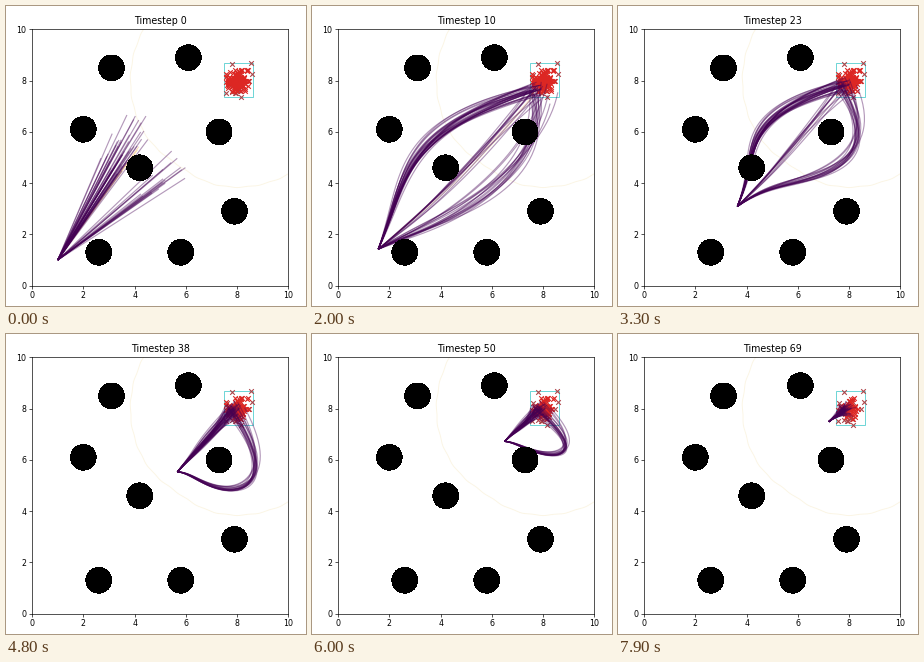
Animation, 300 px wide and 300 px high, one loop 8000 ms. Source, as a matplotlib script:

```python
import numpy as np
import matplotlib.pyplot as plt
from matplotlib.animation import FuncAnimation
from matplotlib.collections import LineCollection
from matplotlib.patches import Circle, Rectangle

FRAMES, HOLD = 80, 10
PURPLE = "#440154"
GOAL = np.array([8.0, 8.0])
OBSTACLES = [(3.1, 8.5), (6.1, 8.9), (2.0, 6.1), (7.3, 6.0),
             (4.2, 4.6), (7.9, 2.9), (2.6, 1.3), (5.8, 1.3)]

# Robot route: a few timesteps and the positions reached there
KEYS = np.array([0, 6, 19, 28, 44, 54, 69], float)
ROUTE = np.array([(1.0, 1.0), (1.2, 1.15), (2.9, 2.46), (4.56, 3.94),
                  (6.12, 6.28), (6.71, 6.94), (7.21, 7.49)])
SLOPES = np.gradient(ROUTE, KEYS, axis=0)

T = np.linspace(0, 1, 40)[:, None]
BASIS = np.hstack([(1 - T) ** 3, 3 * T * (1 - T) ** 2, 3 * T ** 2 * (1 - T), T ** 3])
HOOK = 25 * T * (1 - T) ** 6

rng = np.random.default_rng(7)


def smooth(x, a, b):
    u = np.clip((x - a) / (b - a), 0, 1)
    return u * u * (3 - 2 * u)


def robot_at(step):
    """Position and velocity on the route (cubic Hermite)."""
    i = min(int(np.searchsorted(KEYS, step, "right")) - 1, len(KEYS) - 2)
    span = KEYS[i + 1] - KEYS[i]
    u = (step - KEYS[i]) / span
    rise = u * u * (3 - 2 * u)
    pos = (ROUTE[i] * (1 - rise) + ROUTE[i + 1] * rise
           + span * u * (1 - u) ** 2 * SLOPES[i]
           - span * u * u * (1 - u) * SLOPES[i + 1])
    return pos, SLOPES[i] * (1 - u) + SLOPES[i + 1] * u


def end_at(step):
    return GOAL - (0.1, 0) - np.array([0.15, 0.35]) * (1 - smooth(step, 18, 28))


def bowed(start, end, bulge):
    """Bezier controls of a curve bowed to the left of its chord."""
    chord = end - start
    left = np.array([-chord[1], chord[0]])
    return np.array([start + 0.38 * chord + bulge * left,
                     start + 0.57 * chord + 1.1 * bulge * left, end])


def upper(step, start):
    # The detour widens until the first obstacle is passed
    bulge = (0.065 + 0.0155 * step) * (1 - smooth(step, 20, 27))
    return bowed(start, end_at(step), bulge)


def middle(step, start):
    return bowed(start, end_at(step), -0.06 * np.exp(-step / 20))


def lower(step, start):
    # A corner point pulls the curve under the last obstacle, then slides home
    corner = np.array([8.2 + 2.3 * smooth(step, 8, 30), 4.1])
    pull = corner + (GOAL - corner) * (smooth(step, 54, 66), smooth(step, 44, 58))
    dip = np.array([1.2, 1.3]) * np.exp(-((step - 43) / 6) ** 2)
    lift = (0, 0.9 * np.exp(-((step - 23) / 8) ** 2))
    late = np.array([0.8, -0.6]) * np.exp(-step / 8)
    return np.array([start + 0.32 * (pull - start) - dip + lift,
                     pull, end_at(step) + late])


class Bundle:
    def __init__(self, n, shape, low, high, loose=0.0):
        self.shape, self.loose = shape, loose
        self.noise = rng.normal(size=(n, 3, 2)).clip(-2, 2)
        angle = np.radians(rng.triangular(low, (low + high) / 2, high, n))
        tips = rng.uniform(4.0, 6.6, n) * np.array([np.cos(angle), np.sin(angle)])
        self.rays = ROUTE[0] + tips.T[:, None] * np.array([1 / 3, 2 / 3, 1])[:, None]

    def curves(self, step):
        start, velocity = robot_at(step)
        calm = np.exp(-step / 45)
        spread = np.array([0.17 * calm, 0.36 * calm, 0.19])
        spread *= 1 + self.loose * np.exp(-step / 8)
        ctrl = self.shape(step, start) + self.noise * spread[:, None]
        # Straight rays relax into the bundle's shape
        w = min(1, step / 6) ** 0.6
        ctrl = self.rays * (1 - w) + ctrl * w
        first = np.broadcast_to(start, (len(ctrl), 1, 2))
        return BASIS @ np.concatenate([first, ctrl], axis=1) + w * HOOK * velocity


glowing = Bundle(2, middle, 53, 56)
bundles = [Bundle(10, middle, 53, 60), Bundle(34, upper, 51, 68),
           Bundle(18, lower, 30, 44, loose=2.0)]

fig = plt.figure(figsize=(5, 5), dpi=60, facecolor="white")
ax = fig.add_axes(np.array([26.1, 20.4, 256.2, 256.2]) / 300)
ax.set(xlim=(0, 10), ylim=(0, 10), xticks=range(0, 11, 2), yticks=range(0, 11, 2))
ax.tick_params(labelsize=9.5)
title = ax.set_title("Timestep 0", fontsize=11.4)

for spot in OBSTACLES:
    ax.add_patch(Circle(spot, 0.5, color="black", lw=0, antialiased=False, zorder=3))

# Faint level line around the goal
deg = np.linspace(140, 310, 260)
rad = np.radians(deg)
r = 4.16 - 0.14 * np.exp(-((deg - 235) / 16) ** 2) + 0.015 * np.sin(31 * rad)
ax.plot(GOAL[0] + r * np.cos(rad), GOAL[1] + r * np.sin(rad),
        color="#fbf5e4", lw=1.1, zorder=0.5)

# Goal samples: a steady outer set and a dense core that thins out
ax.add_patch(Rectangle((7.49, 7.38), 1.13, 1.31, fill=False, ec="#55cfd0", lw=1))


def cloud(n, sigma, reach):
    return GOAL + rng.normal(0, sigma, (n, 2)).clip(-reach, reach)


rim = [(7.82, 8.65), (8.55, 8.68), (8.15, 7.38), (7.57, 7.5), (8.58, 8.25)]
ax.scatter(*np.vstack([rim, cloud(36, 0.24, 0.5)]).T, marker="x", s=31, lw=1.3,
           color="#ad4348", zorder=1.2)
core = cloud(130, 0.21, 0.42)
dots = ax.scatter(*core.T, marker="x", s=31, lw=1.3, color="#dd2723", zorder=1.3)

glow = LineCollection([], colors=["#f6c35a", "#f3a95f"], linewidths=1, zorder=1.8)
paths = LineCollection([], colors=PURPLE, alpha=0.4, linewidths=1.4, zorder=2)
ax.add_collection(glow)
ax.add_collection(paths)


def draw(frame):
    step = max(0, frame - HOLD)
    title.set_text(f"Timestep {step}")
    glow.set_segments(glowing.curves(step))
    glow.set_alpha(0.5 * max(0, 1 - step / 26))
    paths.set_segments(np.concatenate([b.curves(step) for b in bundles]))
    dots.set_offsets(core[:int(130 - 1.3 * step)])
    return title, glow, paths, dots


anim = FuncAnimation(fig, draw, frames=FRAMES, interval=100,
                     init_func=lambda: draw(0), repeat=True, blit=False)
plt.show()
```
